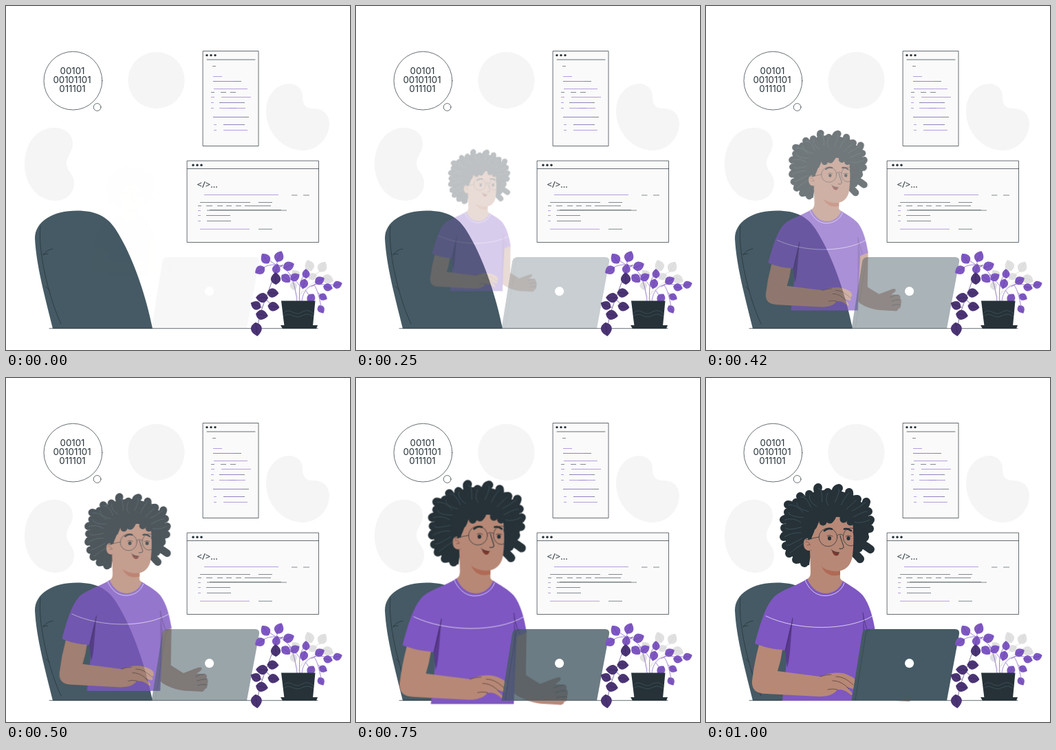
Write an HTML page that moves like this. It is 500 by 500 pixels and loops after 1040 ms.

```html
<!DOCTYPE html>
<html lang="en">
<head>
<meta charset="utf-8">
<title>Coding at the desk</title>
<style>
  html, body { margin: 0; width: 100%; height: 100%; overflow: hidden; background: #fff; }
  svg { display: block; width: 100vw; height: 100vh; }
  .line { fill: none; stroke: #263238; stroke-width: .7; stroke-linecap: round; stroke-linejoin: round; }
  .code { fill: none; stroke-width: .75; }
  .ink { stroke: #59636a; }
  .violet { stroke: #9d7fd2; }
  .dark { fill: #263238; }
  .slate { fill: #455a64; }
  .skin { fill: #b78876; }
  .shirt { fill: #7e57c2; }
  .bits { font: 400 13.3px Inter, Lato, sans-serif; text-anchor: middle; fill: #263238; }
  .tag { font: 400 13px "Noto Sans", "Open Sans", sans-serif; fill: #263238; }
  #person { transform-box: view-box; transform-origin: 184.5px 312px; }
  #locks, #fringe { fill: none; stroke: #263238; stroke-linecap: round; }
</style>
</head>
<body>
<svg viewBox="0 0 500 500">
  <g fill="#f5f5f5">
    <circle cx="218.5" cy="108" r="41.2"/>
    <path d="M68 177C82 176 96 184 97 198C98 212 88 217 88 229C88 241 100 244 99 259C98 274 86 283 72 283C44 283 26 256 27 228C28 200 44 178 68 177Z"/>
    <path d="M412 113C423 113 431 121 431 131C431 145 437 149 447 149C460 149 469 156 470 170C470 192 453 210 431 210C401 209 378 183 378 153C378 130 393 113 412 113Z"/>
  </g>

  <!-- thought bubble -->
  <circle class="line" cx="97.4" cy="108.6" r="42.4" fill="#fff" style="fill:#fff"/>
  <circle class="line" cx="132.6" cy="147" r="5.4" style="fill:#fff"/>
  <g class="bits">
    <text x="96.5" y="98.5">00101</text>
    <text x="96" y="112">00101101</text>
    <text x="96.5" y="125.3">011101</text>
  </g>

  <!-- tall window -->
  <rect class="line" x="286.5" y="65.5" width="80.5" height="138" style="fill:#fafafa"/>
  <path class="line" d="M292 78H362"/>
  <g class="dark"><circle cx="292" cy="71.6" r="1.7"/><circle cx="298" cy="71.6" r="1.7"/><circle cx="304" cy="71.6" r="1.7"/></g>
  <path class="code ink" d="M300 87.5h5M301 109.5h41M298 125.5h5M312 125.5h8M326 125.5h8M310 140.5h37M301 161.5h52M316 172.5h31"/>
  <path class="code violet" d="M301 102.5h13M302 109.5h30M302 120.5h49M298 132.5h5M313 132.5h43M298 140.5h4M314 140.5h28M298 148.5h4M310 148.5h38M324 148.5h11M303 161.5h40M302 172.5h4M318 172.5h26M302 180.5h4M316 180.5h35"/>

  <!-- wide window -->
  <rect class="line" x="263.5" y="225" width="191" height="118.5" style="fill:#fafafa"/>
  <path class="line" d="M263.5 236.5H454.5"/>
  <g class="dark"><circle cx="272" cy="231.3" r="1.7"/><circle cx="278" cy="231.3" r="1.7"/><circle cx="284" cy="231.3" r="1.7"/></g>
  <text class="tag" x="277.5" y="263.5">&lt;/&gt;...</text>
  <path class="code ink" d="M415 275h8.500M432 275h9M282 285.500h73M367 285.500h20M279 290.500h5M291 290.500h9M307 290.500h8M320 290.500h8M334 290.500h8M347 290.500h38M292 297h116M296 296.500h104M291 304.500h35M292 312.500h35M367 324.300h20"/>
  <path class="code violet" d="M288 274.500h108M279 297.500h4M279 304.500h4M279 312.500h4M282 324.300h72"/>

  <!-- chair and desk -->
  <path class="slate" d="M68 469C57 424 44 378 42 338C42 313 68 297.500 103 297.500C131 297.500 147 306 159 324C186 366 204 424 213 469Z"/>
  <path class="line" d="M50 320C46 356 62 424 80 462M54 362Q59 354 68 353M54 361L61 360M58 408L63 413"/>
  <path class="line" d="M63 468.700H453"/>

  <g id="person">
    <!-- far arm -->
    <path class="skin" d="M232 370L225.500 429C225 442 225 450 231 456C241 463 254 467 266 468.600L292 470Q298 471 299 466Q304 465 303 459Q306 452 302 448Q304 443 299 442L286 441Q296 436 294 432Q292 430 285 433L265 440.600L245 428L246 366Z"/>
    <path class="line" d="M299 442Q292 442 285 446M302 450Q294 450 287 453M303 459Q294 458 288 460"/>
    <!-- hair behind the face -->
    <path class="dark" d="M150 272C132 273 119 256 115 234C110 207 126 180 150 169C174 157 210 162 228 183C242 200 240 232 226 252L212 258L200 210H158Z"/>
    <g id="locks" stroke-width="12"></g>
    <!-- torso -->
    <path class="shirt" d="M147 292C132 302 112 307 100 317C86 331 79 357 71 386Q92 395 115 396L122 368L111 469H228L232 374L246 368C243 349 238 329 228 316C220 307 208 301 199 295Z"/>
    <path d="M126 349C121 366 118 381 115 396L118 421C123 406 123 376 126 349Z" fill="#59398f"/>
    <path d="M228 341Q229 357 232 374L226 462Q229 402 228 341Z" fill="#59398f" opacity=".65"/>
    <path d="M87 346C133 368 205 368 242 346" class="line" style="stroke:#fff"/>
    <path class="line" d="M126 349Q123 370 115 396M228 341Q230 357 236 370" style="stroke:#3f2b61"/>
    <!-- neck -->
    <path class="skin" d="M151 250L152 282Q152 290 147 292C154 307 164 313 174 313C185 313 195 306 199 295Q194 293 195 287V265Z"/>
    <path d="M167 272C173 287 184 289 195 286V277Q181 282 167 272Z" fill="#b06a55"/>
    <path d="M144 294C151 310 162 316.500 173 316.500C185 316.500 197 310 201 298" class="line" style="stroke:#fff"/>
    <!-- head -->
    <path class="skin" d="M153 235C147 230 141 234 142 242C142 249 148 253 153 250C155 263 166 277 181 280C199 284 211 275 213 258C215 242 215 222 212 202H160Z"/>
    <path class="line" d="M145 238Q150 237 151 243M147 243L151 242" style="stroke:#7c4b3e"/>
    <g id="fringe" stroke-width="11"></g>
    <path class="dark" d="M149 236C157 232 157 216 166 207C177 207 182 201 187 199C194 204 206 204 214 212L218 184L160 174L140 205Z"/>
    <path id="strands" class="line" style="stroke:#455a64"/>
    <path class="line" style="stroke-width:2.700" d="M172 222Q177 217.500 183 219.500M201 219.500Q206 218 211 222"/>
    <ellipse class="dark" cx="179.500" cy="233" rx="2.600" ry="2.900"/>
    <ellipse class="dark" cx="207" cy="233" rx="2.600" ry="2.900"/>
    <path class="line" d="M176 229.500Q180 227 184 230M203 230Q207 227.500 211 230"/>
    <g class="line">
      <circle cx="177.500" cy="231.500" r="13.300"/>
      <ellipse cx="210.500" cy="231" rx="11.200" ry="13"/>
      <path d="M190.500 229Q195 225 199.500 229M164.500 231L145 235"/>
    </g>
    <path class="line" style="stroke-width:1" d="M195 229C197 238 200 243 200 246Q199 249 194 248"/>
    <path d="M183 250.500Q188 254 193 253.500Q194 258 189 258.500Q184 257 183 250.500Z" fill="#7b382f"/>
    <path class="line" d="M182 249.500Q185 253 194 254"/>
    <!-- near arm -->
    <path class="skin" d="M77 388Q70 414 67 440C66 453 73 459 88 459L164 463C177 463 186 460 191 453C199 455 204 460 211 461Q214 460 211 456L204 449L214 452Q218 451 215 447L218 443Q218 436 209 433C199 427 184 427 166 434L104 426Q109 411 111 395Q93 394 77 388Z"/>
    <path class="line" d="M189 434C199 434 206 439 214 446M184 440C195 440 202 446 208 452M166 434Q174 431 182 431M191 453Q183 451 177 453" style="stroke:#4c3934"/>
    <path d="M189 455C197 450 205 456 211 461L201 462Q196 455 189 455Z" class="shirt"/>
  </g>

  <g id="laptop">
    <path class="slate" d="M211.500 469L227 372Q228 365 235 365H362Q369 365 368 372L350 469Z"/>
    <path class="line" d="M217 468L232 373Q233 366 238 365.500" opacity=".55"/>
    <circle cx="295.600" cy="414.700" r="6.600" fill="#fff"/>
  </g>

  <!-- plant -->
  <g class="line" style="stroke:#d5d5d5">
    <path d="M427 429C425 408 430 392 442 384M428 420C435 400 447 389 459 385M429 418Q445 399 462 397M426 427Q417 412 418 399"/>
  </g>
  <g id="paleLeaves"></g>
  <g class="line" style="stroke:#7e57c2">
    <path d="M423 429C420 402 413 379 392 376C377 376 372 381 369 386M392 376L380 368M393 376L397 365M398 377L411 378M414 390L408 396M427 429C425 403 429 395 436 388M428 408L420 398M430 429C432 409 446 402 462 405Q474 405 485 405M444 408L456 400M448 406C454 413 456 430 459 440M454 417L462 424M436 414L444 425"/>
  </g>
  <path class="line" style="stroke:#4b3474" d="M402 376C389 386 385 407 379 421C373 437 367 451 365 474M389 398L392 392M383 413L389 418M377 426L389 437M372 438L363 434M369 448L374 449"/>
  <g id="leaves"></g>
  <path class="dark" d="M400 428.500H449.500L446 465H404.500Z"/>
  <path class="dark" d="M399 464H453L451 469H402Z"/>
  <path class="line" style="stroke:#455a64" d="M404 446C412 437 419 451 428 446S440 442 447 447M404 451C412 443 419 455 428 451S440 447 446 451"/>
</svg>

<script>
  const $ = id => document.getElementById(id);

  function add(parent, d, attrs = {}) {
    const path = document.createElementNS('http://www.w3.org/2000/svg', 'path');
    path.setAttribute('d', d);
    for (const key in attrs) path.setAttribute(key, attrs[key]);
    parent.append(path);
  }

  // Each leaf: centre x, centre y, direction in degrees, length.
  function addLeaves(id, fill, vein, list) {
    for (const [x, y, turn, len] of list) {
      const h = len / 2, w = len * .53;
      const transform = `translate(${x} ${y}) rotate(${turn})`;
      add($(id), `M${-h} 0C${-h * .6} ${-w} ${h * .3} ${-w} ${h} 0C${h * .3} ${w} ${-h * .6} ${w} ${-h} 0Z`, { fill, transform });
      add($(id), `M${-h} 0H${h * .75}`, { stroke: vein, 'stroke-width': .4, transform });
    }
  }

  addLeaves('paleLeaves', '#e0e0e0', '#cfcfcf', [
    [441, 377, -110, 17], [460, 379, -60, 17], [468, 397, 20, 17],
    [421, 390, -130, 15], [418, 407, 75, 13], [446, 393, -25, 13]
  ]);
  addLeaves('leaves', '#7e57c2', '#5c3c98', [
    [377, 367, -125, 17], [397, 364, -65, 17], [411, 378, -22, 17],
    [393, 382, -75, 15], [369, 384, 150, 16], [407, 396, 40, 16],
    [420, 394, -32, 15], [436, 389, -92, 14], [433, 404, 105, 15],
    [456, 399, -25, 15], [468, 409, 12, 14], [482, 405, -18, 14],
    [461, 423, 28, 13], [443, 425, 125, 15], [458, 441, 60, 13]
  ]);
  addLeaves('leaves', '#4b3474', '#2f1f4c', [
    [392, 396, -92, 18], [388, 417, 4, 17], [372, 424, 182, 18],
    [389, 437, 8, 17], [363, 435, 205, 16], [372, 449, 10, 18],
    [364, 470, 82, 20]
  ]);

  // Curls fan out from the middle of the head to these tips.
  const tips = [
    [143, 269], [131, 264], [121, 255], [116, 244], [113, 231], [114, 218],
    [113, 206], [119, 195], [119, 184], [131, 181], [137, 172], [150, 169],
    [163, 159], [177, 166], [193, 160], [208, 166], [220, 176], [233, 180],
    [236, 194], [239, 206], [238, 219], [231, 231], [239, 249], [224, 263]
  ];
  const mid = [178, 215];
  const toward = ([x, y], f) => [mid[0] + (x - mid[0]) * f, mid[1] + (y - mid[1]) * f];
  let strands = '';
  tips.forEach((tip, i) => {
    const [ax, ay] = toward(tip, .72), [bx, by] = toward(tip, .88);
    const bend = i % 2 ? 5 : -5;
    add($('locks'), `M${ax} ${ay}Q${bx + bend} ${by + bend} ${tip}`);
    if (i > 1 && i < 20) {
      const [cx, cy] = toward(tip, .62);
      strands += `M${cx} ${cy}Q${bx - bend} ${by + bend} ${toward(tip, .98)}`;
    }
  });
  $('strands').setAttribute('d', strands);
  for (const d of ['M160 198Q162 206 157 216', 'M168 196Q174 202 170 209', 'M182 192Q187 199 180 206',
    'M196 193Q203 199 200 205', 'M207 194Q215 202 210 209', 'M218 198Q224 214 219 224']) {
    add($('fringe'), d, d.startsWith('M160') ? { 'stroke-width': 8 } : {});
  }

  const LOOP = 1040, FPS = 24;
  const entrance = [
    $('person').animate(
      [{ opacity: 0, transform: 'scale(.5)' }, { opacity: 1, transform: 'scale(1)' }],
      { duration: 1000, easing: 'cubic-bezier(.36, -.01, .5, 1.38)', fill: 'both' }),
    $('laptop').animate([{ opacity: 0 }, { opacity: 1 }], { duration: 1000, fill: 'both' })
  ];
  entrance.forEach(a => a.pause());

  const start = performance.now();
  function draw(now) {
    const t = Math.max(0, now - start) % LOOP;
    const step = Math.min(24, Math.floor((t + 4) * FPS / 1000));
    const time = Math.min(1000, (step + 1) * 1000 / FPS);
    entrance.forEach(a => { a.currentTime = time; });
    requestAnimationFrame(draw);
  }
  draw(start);
</script>
</body>
</html>
```
